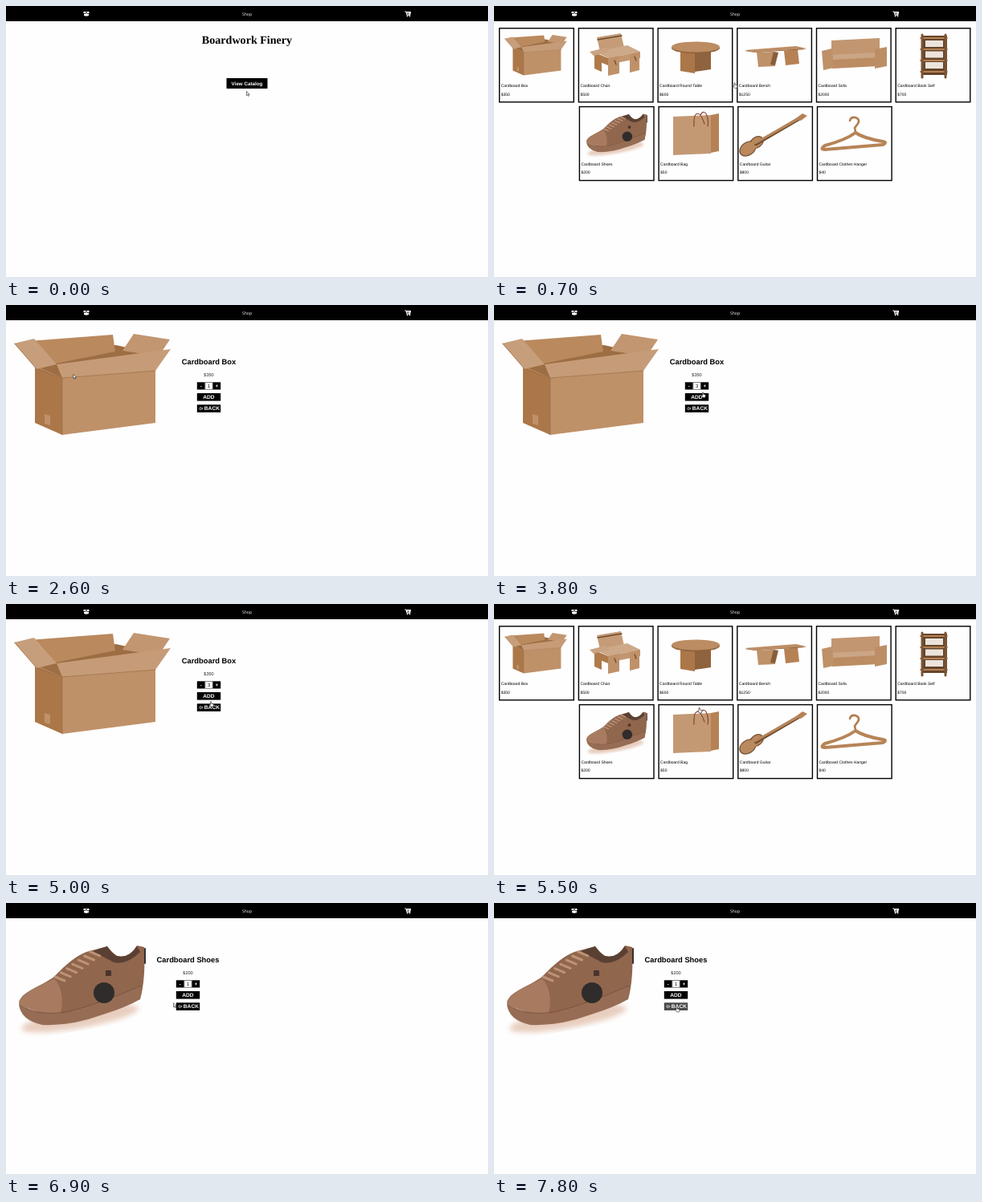
Recreate the animation shown at these times as an HTML page. Size 600 px wide and 338 px high, loop 8000 ms.

```html
<!DOCTYPE html>
<html lang="en">
<head>
<meta charset="utf-8">
<title>Cardboard shop</title>
<style>
  html, body { margin: 0; width: 100%; height: 100%; overflow: hidden; background: #fefefe; }
  svg { display: block; width: 100vw; height: 100vh; text-rendering: geometricPrecision; }
  text { font-family: "Liberation Sans", Arial, sans-serif; }
  .mid { text-anchor: middle; }
  .bold { font-weight: bold; }
  .sans { font-family: "Open Sans", sans-serif; }
  .serif { font-family: "Liberation Serif", Times, serif; }
</style>
</head>
<body>
<svg id="stage" viewBox="0 0 600 338"></svg>
<script>
// Drawing helpers
const kraft = light => `hsl(28 40% ${light}%)`;
const path = (d, fill, extra = '') => `<path d="${d}" fill="${fill}" ${extra}/>`;
const line = (d, color, width) => path(d, 'none',
  `stroke="${color}" stroke-width="${width}" stroke-linecap="round" stroke-linejoin="round"`);
const text = (x, y, size, str, extra = '') => `<text x="${x}" y="${y}" font-size="${size}" ${extra}>${str}</text>`;
const rect = (x, y, w, h, extra = '') => `<rect x="${x}" y="${y}" width="${w}" height="${h}" ${extra}/>`;
const ellipse = (x, y, rx, ry, turn, fill, extra = '') =>
  `<ellipse rx="${rx}" ry="${ry}" transform="translate(${x} ${y}) rotate(${turn})" fill="${fill}" ${extra}/>`;
const repeat = (n, draw) => Array.from({ length: n }, (_, i) => draw(i)).join('');
const use = (id, x, y, scale) => `<use href="#${id}" transform="translate(${x} ${y}) scale(${scale})"/>`;

// A cardboard sheet: one corner, two edge vectors and a lightness
const sheet = (x, y, ax, ay, bx, by, light) =>
  path(`M${x} ${y}l${ax} ${ay}l${bx} ${by}l${-ax} ${-ay}z`, kraft(light));

const boxArt =
  path('M36 76L48 58L137 50L190 62L72 92Z', kraft(44)) +
  path('M28 45L133 37L136 58L62 73Z', kraft(55)) +
  sheet(159, 36, 45, 7, -14, 21, 60) +
  sheet(36, 76, 34, 15, 0, 71, 48) +
  sheet(70, 91, 116, -15, 0, 71, 58) +
  sheet(10, 48, 25, -6, 28, 32, 63) +
  path('M205 55L186 82L70 91L63 74Z', kraft(62)) +
  sheet(48, 136, 7, 2, 0, 12, 58) +
  line('M11 48L38 80L70 91L186 82M70 91V162', kraft(42), .6);

const shoeArt =
  ellipse(92, 144, 74, 12, -10, '#dcb49c', 'opacity=".65" filter="url(#soft)"') +
  path('M16 124C20 110 40 106 60 92Q82 68 100 61L126 54Q132 62 138 66Q153 70 163 53L172 55Q174 95 167 120L121 138L60 146Z', '#90664d') +
  path('M16 126C20 110 40 106 60 94Q74 110 68 138Q40 140 16 126Z', '#a87b60') +
  path('M16 126Q40 142 75 136Q120 125 168 103L167 120Q150 130 121 139Q80 154 45 152Q18 146 16 126Z', '#966d54') +
  path('M108 60L126 54Q132 63 138 66Q152 70 163 54L167 61Q150 78 134 74Z', '#5a4033') +
  line('M17 127Q40 142 75 136Q120 125 168 103', '#704b39', .7) +
  line('M173 57V75', '#37302e', 2) +
  repeat(7, i => line(`M${61 + 7.3 * i} ${92 - 5.2 * i}l12 5`, '#bd9377', 3)) +
  `<circle cx="122" cy="112" r="13" fill="#302c2b"/>` + rect(124, 84, 7, 7, 'fill="#49352e"');

const chairArt =
  sheet(128, 39, 30, -5, 4, 18, 62) + sheet(125, 58, 17, 7, 0, 9, 49) + sheet(125, 58, 9, 4, 0, 20, 49) +
  sheet(126, 57, 40, -8, 16, 8, 67) + sheet(142, 65, 40, -8, 0, 8, 60) +
  sheet(142, 65, 14, -3, 0, 22, 58) + sheet(169, 60, 12, -3, 0, 23, 58) + sheet(119, 57, 20, -5, 5, 5, 65) +
  line('M129 42l30-5M150 68l2 5M175 63l2 5', kraft(30), 1.3);

const tableArt = sheet(232, 54, 18, 3, 0, 27, 48) + sheet(250, 57, 20, -3, 0, 25, 40) +
  ellipse(251, 52.5, 30, 6.8, 0, kraft(40)) + ellipse(251, 51, 30, 6.6, 0, kraft(56));

const benchArt = sheet(327, 58, 21, -1, 2, 18, 58) + sheet(348, 57, 6, 1, -4, 16, 38) +
  sheet(361, 56, 17, -2, 2, 18, 52) + sheet(312, 56, 64, -4, 13, 2, 38) + sheet(312, 55, 64, -5, 13, 3, 57);

const sofaArt = sheet(420, 43, 60, -3, 0, 20, 60) + sheet(419, 61, 58, -3, 4, 7, 66) +
  sheet(421, 67, 58, -3, 0, 11, 56) + sheet(408, 56, 13, -3, 2, 24, 58) + sheet(474, 54, 15, -3, 0, 24, 57);

const shelfArt = sheet(533, 37, 31, 0, 0, 49, 28) +
  repeat(3, i => rect(537, 43 + 13.5 * i, 22, 8, 'fill="#ece4dc"')) +
  repeat(4, i => line(`M531 ${40 + 14 * i}h33`, kraft(52), 2)) +
  repeat(2, i => line(`M${533 + 29 * i} 36v53`, kraft(34), 3));

const bagArt = sheet(223, 138, 47, -2, 0, 48, 61) + sheet(270, 136, 10, -2, 0, 47, 52) +
  line('M249 150C248 130 256 129 262 147M257 136C262 126 268 138 266 150', '#823f2c', 1.1);

const guitarEdge = `stroke="${kraft(32)}" stroke-width="1.2"`;
const guitarArt = ellipse(327, 170, 9, 6.5, -35, kraft(55), guitarEdge) +
  ellipse(316, 178, 11, 8, -35, kraft(55), guitarEdge) + ellipse(323, 173.5, 8, 5, -35, kraft(55)) +
  line('M326 172L379 141', kraft(32), 4.4) + line('M325 171L379 140.5', kraft(54), 2.6) +
  sheet(376, 140, 8, -6, 6, 3, 52);

const hangerArt = line('M443 143Q444 138 450 139Q457 142 452 148L449 152L450 157', kraft(50), 2.6) +
  line('M450 158Q438 167 412 174Q405 179 412 179L484 173Q490 170 484 169Q460 165 450 158Z', kraft(53), 4);

// Catalog: six cards above, four centred below
const products = [
  ['Box', 350, use('box', 9, 21.6, .4)], ['Chair', 500, chairArt], ['Round Table', 600, tableArt],
  ['Bench', 1250, benchArt], ['Sofa', 2000, sofaArt], ['Book Self', 700, shelfArt],
  ['Shoes', 200, use('shoe', 107.3, 109.1, .48)], ['Bag', 50, bagArt], ['Guitar', 800, guitarArt],
  ['Clothes Hanger', 40, hangerArt]
].map(([name, price, art], i) => {
  const row = i < 6 ? 0 : 1;
  return { name, price, art, area: [6.7 + 98.7 * (i - 5 * row) + row, 27.8 + 97.8 * row, 92.6, 92] };
});

const card = ({ name, price, art, area: [x, y, w, h] }) =>
  rect(x, y, w, h, 'fill="#fefefe" stroke="#000" stroke-width="1.4"') + art +
  text(x + 2, y + 73.2, 5, 'Cardboard ' + name) + text(x + 2, y + 83.7, 5, '$' + price);

// Clickable areas of each page: [x, y, width, height]
const panel = cx => [[cx - 14.7, 96.3, 9.8, 9.2], [cx + 4.9, 96.3, 9.8, 9.2],
  ...[110, 124.3].map(y => [cx - 14.7, y, 29.4, 9.6])];
const areas = {
  home: [[274.5, 90, 51, 13]], catalog: products.map(p => p.area),
  boxPage: panel(252.5), shoePage: panel(226.5)
};
const buttons = id => areas[id].map(a => rect(...a, 'class="button"')).join('');

const detail = (id, art, cx, { name, price }) => `<g id="${id}"><use href="#${art}"/>` +
  text(cx, 74, 9.35, 'Cardboard ' + name, 'class="mid bold"') +
  text(cx, 89, 5.6, '$' + price, 'class="mid" fill="#222"') + buttons(id) +
  rect(cx - 4.6, 96.6, 9.2, 8.6, 'fill="#fff" stroke="#333" stroke-width=".6"') +
  text(cx, 103, 5.8, '1', 'class="mid qty"') + '<g fill="#fff" class="mid bold">' +
  text(cx - 9.8, 103, 6.3, '-') + text(cx + 9.8, 103, 6.3, '+') +
  text(cx, 117.2, 6.6, 'ADD') + text(cx + 3.9, 131.4, 6.6, 'BACK') + '</g>' +
  path(`M${cx - 12.3} 129.1l2-1.8v1h2.6v1.6h-2.6v1z`, 'none', 'stroke="#fff" stroke-width=".6"') + '</g>';

const navBar = rect(0, 0, 600, 19) +
  path('M97 6.7L100 7.2L98.6 9.3L96 8.6ZM103 6.7L100 7.2L101.4 9.3L104 8.6ZM97 9.4L98.9 9.9L100 8.3L101.1 9.9L103 9.4V12L100 12.8L97 12Z', '#fff') +
  text(300, 11.5, 5.1, 'Shop', 'class="mid sans" fill="#fff"') +
  line('M496.6 7H498L499.1 11.6H503', '#fff', .9) + path('M498 7.1H504.2L503.3 10.9H498.9Z', '#fff') +
  repeat(2, i => `<circle cx="${499.5 + 3.1 * i}" cy="12.8" r=".8" fill="#fff"/>`) +
  text(500.4, 10.5, 4.3, '0', 'id="count" class="mid bold"');

const $ = id => document.getElementById(id);
$('stage').innerHTML =
  `<defs><filter id="soft"><feGaussianBlur stdDeviation="3"/></filter>
   <g id="box">${boxArt}</g><g id="shoe">${shoeArt}</g></defs>` +
  rect(0, 0, 600, 338, 'fill="#fefefe"') + navBar +
  '<g id="home">' + text(300, 47.4, 14.1, 'Boardwork Finery', 'class="mid bold serif"') +
  buttons('home') + text(300, 98.8, 6.25, 'View Catalog', 'class="mid bold" fill="#fff"') + '</g>' +
  `<g id="catalog">${products.map(card).join('')}</g>` +
  detail('boxPage', 'box', 252.5, products[0]) + detail('shoePage', 'shoe', 226.5, products[6]) +
  `<g id="cursor" fill="#fff" stroke="#222" stroke-width=".6" stroke-linejoin="round">
   <path id="arrow" d="M0 0V5.2L1.2 4.1L2 6L2.9 5.6L2.1 3.8H3.7Z"/>
   <path id="hand" d="M0 0Q.7 -.6 1.2 0V2.4L3.6 2.9Q4 3.1 3.9 3.8L3.3 6.4H.6L-1.3 3.9Q-1.2 3 -.4 3.5L0 3.9Z"/></g>`;

// Last value whose start time has passed
const stepAt = (steps, t) => steps.filter(s => s[0] <= t).pop()[1];
const pageAt = t => stepAt([[0, 'home'], [700, 'catalog'], [2400, 'boxPage'], [5500, 'catalog'], [6200, 'shoePage']], t);

// Pointer moves: start, end, destination
const moves = [
  [200, 400, 299, 96], [700, 1200, 215, 121.5], [1300, 2100, 51, 84], [2400, 3200, 261, 99.5],
  [3700, 3800, 259.5, 109], [3800, 4300, 254, 114], [4700, 5300, 255, 129.5],
  [5500, 6100, 150, 152.5], [6300, 7200, 229, 115], [7300, 7800, 227, 129.5]];

function pointerAt(t) {
  return moves.reduce(([x, y], [start, end, toX, toY]) => {
    const u = Math.min(1, Math.max(0, (t - start) / (end - start))), ease = u * u * (3 - 2 * u);
    return [x + (toX - x) * ease, y + (toY - y) * ease];
  }, [299.5, 106.5]);
}

const inside = ([px, py], [x, y, w, h]) => px >= x && px <= x + w && py >= y && py <= y + h;
const overLink = t => areas[pageAt(t)].some(area => inside(pointerAt(t), area));

function render(now) {
  const t = Math.floor(now % 8000 / 100) * 100;
  const page = pageAt(t), pointer = pointerAt(t);
  for (const id in areas) $(id).style.display = id === page ? '' : 'none';
  $(page).querySelectorAll('.button').forEach((el, i) =>
    el.setAttribute('fill', inside(pointer, areas[page][i]) ? '#484848' : '#000'));
  $('boxPage').querySelector('.qty').textContent = stepAt([[0, 1], [3300, 2], [3500, 3]], t);
  $('count').textContent = stepAt([[0, 0], [4500, 3], [7300, 4]], t);
  // The pointer shape lags one tick behind a page change
  const hand = overLink(t) || overLink(Math.max(0, t - 100));
  $('hand').style.display = hand ? '' : 'none';
  $('arrow').style.display = hand ? 'none' : '';
  $('cursor').setAttribute('transform', `translate(${pointer})`);
}

const start = performance.now();
function loop() {
  render(performance.now() - start);
  requestAnimationFrame(loop);
}
loop();
</script>
</body>
</html>
```
